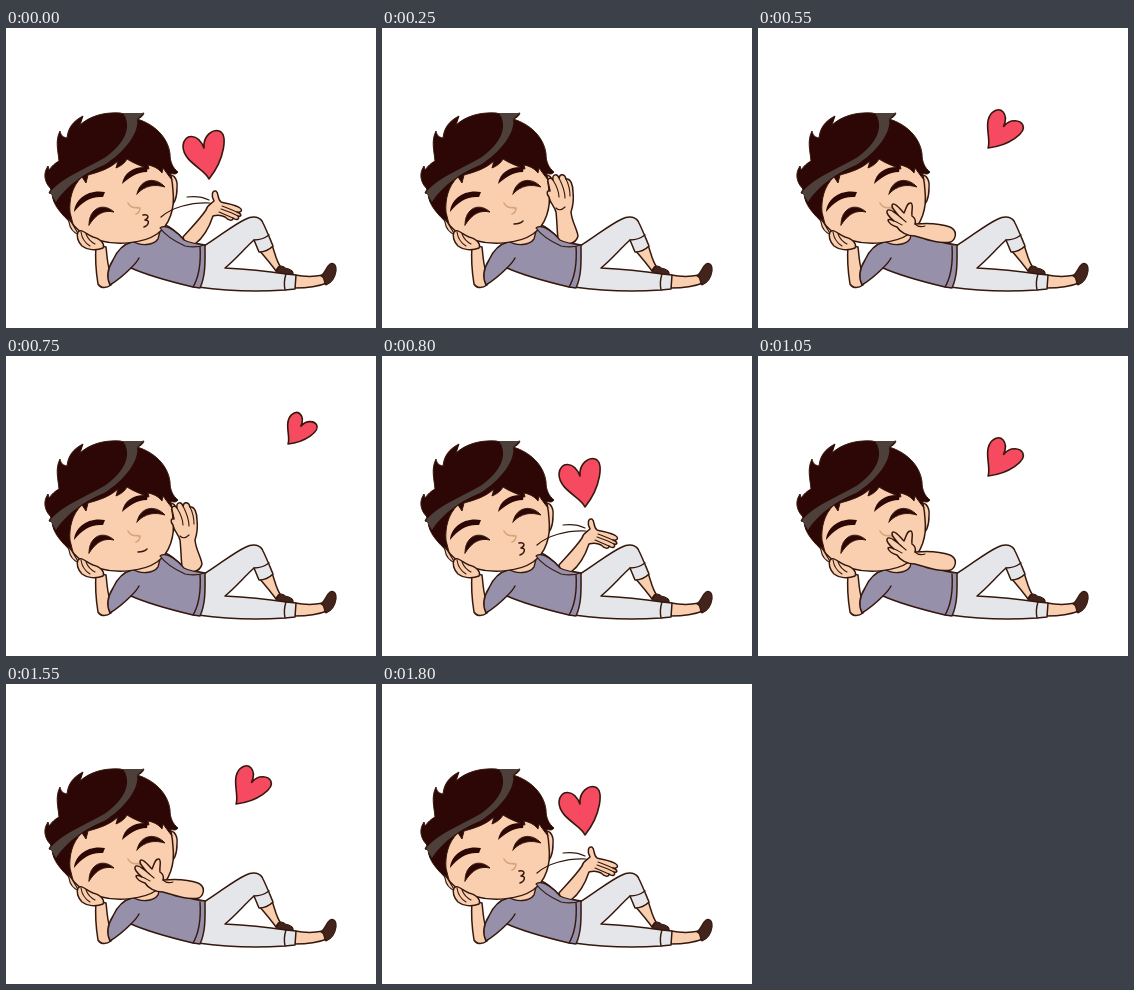
Recreate the animation shown at these times as an HTML page with a canvas. Size 370 px wide and 300 px high, loop 2000 ms.

```html
<!DOCTYPE html>
<html lang="en">
<head>
<meta charset="utf-8">
<title>Blown kiss</title>
<style>
html, body { margin: 0; width: 100%; height: 100%; overflow: hidden; background: #fff; }
canvas { display: block; width: 370px; height: 300px; }
</style>
</head>
<body>
<canvas id="stage" width="370" height="300"></canvas>
<script>
const ctx = document.getElementById('stage').getContext('2d');
const INK = '#35180d', HAIR = '#2d0705', SHINE = '#4d403b', SKIN = '#facfaf';
const SHIRT = '#9690aa', CLOTH = '#e4e6e9', SHOE = '#42241d', RED = '#f64a60';
const LOOP = 2000;

// start time, pose, heart place
const STEPS = [
  [0, 'blow', 'near'], [50, 'mouth', null], [250, 'cheek', null], [300, 'blow', 'near'],
  [550, 'mouth', 'mid'], [750, 'cheek', 'far'], [800, 'blow', 'near'],
  [1050, 'mouth', 'mid'], [1250, 'cheek', 'far'], [1300, 'blow', 'near'],
  [1550, 'mouth', 'mid'], [1750, 'cheek', 'far'], [1800, 'blow', 'near']
];

// tip x, tip y, degrees, scale
const HEARTS = { near: [203, 151, 0, 1], mid: [230, 120, 45, 0.85], far: [282, 88, 45, 0.7] };

function shape(d, fill, width = 1.5) {
  const p = new Path2D(d);
  ctx.fillStyle = fill;
  ctx.fill(p);
  if (width) stroke(p, width);
}

function stroke(p, width, color = INK) {
  ctx.strokeStyle = color;
  ctx.lineWidth = width;
  ctx.stroke(p);
}

function line(d, width = 1.4, color = INK) {
  stroke(new Path2D(d), width, color);
}

function drawLegs() {
  // feet
  shape('M253 222 L266 217 C269 225 270 232 274 238 L270 243 C265 236 259 229 253 222 Z', SKIN);
  shape('M270 243 C272 237 276 237 279 240 C284 241 288 243 287 247 L274 246 Z', SHOE, 1.2);
  shape('M289 247 C299 249 308 249 317 247 L321 255 C311 259 300 260 289 260 Z', SKIN);
  shape('M315 248 C319 245 320 239 324 236 C328 234 331 238 330 243 C329 250 325 255 320 257 C317 254 320 250 315 248 Z', SHOE, 1.2);
  // trousers
  shape('M198 218 C214 208 227 197 240 191 C247 187 255 189 257 195 C261 203 264 211 267 218 C263 222 258 224 253 224 ' +
    'L248 212 C238 221 230 231 219 240 C239 241 260 243 280 246 L290 247 L289 261 L279 262 C250 264 220 263 192 259 Z', CLOTH);
  line('M248 212 C253 212 259 210 263 207 M280 246 C278 252 278 257 279 262');
}

function drawShirt() {
  shape('M90 217 C89 231 90 244 92 256 C95 261 101 260 105 257 L104 243 C101 236 101 226 100 219 Z', SKIN);
  shape('M126 214 C118 216 111 223 107 232 C102 240 100 249 104 257 C112 252 119 246 125 240 ' +
    'C143 248 166 254 187 259 L194 260 C200 247 199 232 199 217 C190 216 183 214 178 212 ' +
    'C172 205 165 199 157 196 L148 206 C141 211 134 214 126 214 Z', SHIRT);
  line('M125 240 C128 237 131 234 133 230 M187 259 C193 249 195 234 194 218');
  shape('M126 213 C134 218 147 218 152 211 L155 199 L130 205 Z', SKIN, 1.3);
}

function drawFace(mouth) {
  // ear, then head
  shape('M160 150 C166 143 172 150 171 160 C171 170 168 178 163 178 Z', SKIN);
  shape('M62 187 C66 199 76 207 91 212 C112 218 138 215 151 206 C164 197 169 180 167 163 ' +
    'C166 146 162 130 150 122 L82 130 L62 155 Z', SKIN);
  shape('M67 197 C55 186 47 177 46 166 L43 165 L45 161 C38 154 37 145 42 138 L43 142 C46 138 49 135 53 133 ' +
    'C52 122 49 113 54 103 C55 108 57 109 61 110 C62 100 67 93 77 88 L74 97 C84 88 98 84 114 85 ' +
    'C122 87 130 87 138 85 C137 88 135 90 131 91 C148 96 162 109 164 126 C164 134 167 140 172 144 ' +
    'C170 147 167 146 164 145 L166 152 C162 147 160 144 157 140 L156 145 C152 140 147 138 142 137 ' +
    'L143 141 C135 138 127 135 121 131 C119 135 115 138 110 140 L112 133 C103 141 93 144 82 147 ' +
    'L80 155 L76 149 C66 158 63 172 64 184 Z', HAIR, 1);
  // hair shine
  shape('M117 85 L138 85 L131 91 C134 104 118 125 98 137 C80 144 60 158 50 174 L44 164 ' +
    'C58 148 82 140 100 129 C115 118 128 101 117 85 Z', SHINE, 0);
  // brows
  shape('M68 184 C69 171 82 161 99 164 L97 169 C85 168 76 174 68 184 Z', HAIR, 0);
  shape('M116 156 C118 144 128 138 142 139 L141 144 C131 144 124 149 116 156 Z', HAIR, 0);
  // closed eyes
  shape('M83 197 C83 180 97 174 108 184 C98 182 91 185 83 197 Z', HAIR, 1);
  shape('M131 166 C134 151 149 148 159 159 C149 156 139 157 131 166 Z', HAIR, 1);
  line('M122 175 C125 181 130 179 134 180 C134 183 133 185 130 186', 1.6, '#d2a67e');
  if (mouth === 'blow') line('M137 187 C142 186 144 189 139 192 C145 192 142 198 138 199', 1.5);
  if (mouth === 'cheek') line('M132 196 C136 196 139 195 141 193', 1.5);
}

function drawRestingHand() {
  shape('M67 197 C64 192 61 188 63 194 C64 201 68 205 73 207 Z', SKIN, 1.2);
  shape('M72 204 C75 200 80 206 87 209 C95 211 99 216 97 220 C90 223 81 222 76 218 C72 214 70 208 72 204 Z', SKIN);
  line('M75 204 C76 211 79 215 84 218 M80 206 C82 211 85 214 89 216', 1.1);
}

function drawSleeve() {
  shape('M154 200 C161 195 173 206 178 212 C184 215 191 216 198 217 C191 220 184 219 179 218 C168 213 159 207 154 200 Z', SHIRT, 1.2);
}

const arms = {
  blow() {
    shape('M177 209 C185 200 194 191 200 182 C201 177 205 176 208 173 C205 168 206 162 210 163 C213 165 211 171 215 174 ' +
      'C222 176 230 177 234 180 C237 182 235 185 231 184 C236 186 236 189 232 188 C234 191 231 193 227 190 ' +
      'C227 194 222 192 219 189 C215 187 211 187 207 188 C203 200 197 210 189 216 C183 218 178 215 177 209 Z', SKIN);
    line('M216 178 C222 180 226 182 231 184 M215 181 C221 183 227 185 232 188 M213 184 C218 186 222 188 227 190', 1.1);
    drawSleeve();
    line('M155 189 C165 180 184 174 204 175', 1.2);
    line('M181 169 C189 168 197 169 203 172', 1.2);
  },
  cheek() {
    shape('M176 211 C175 202 175 193 174 184 C173 179 168 175 167 169 C164 165 165 162 168 163 L166 154 ' +
      'C165 150 169 149 171 152 C170 146 175 145 177 150 C178 145 183 146 184 151 C189 150 191 158 191 164 ' +
      'C192 172 191 178 189 184 C190 194 195 201 196 208 C194 216 184 219 176 211 Z', SKIN);
    line('M171 152 C174 157 177 163 177 169 M177 150 C180 156 183 163 183 170 M184 151 C187 157 188 162 188 168 M174 180 C177 183 180 182 183 179', 1.1);
    drawSleeve();
  },
  mouth() {
    shape('M157 196 C168 195 181 195 192 199 C199 202 199 210 193 214 C181 216 170 212 157 208 ' +
      'C149 208 142 204 139 199 C135 198 130 195 130 192 C131 191 134 192 136 193 C131 189 127 184 130 182 ' +
      'C133 181 137 185 140 187 C136 182 132 178 135 176 C138 175 142 181 146 185 C148 181 149 174 153 175 ' +
      'C156 177 153 183 154 188 C157 190 158 193 157 196 Z', SKIN);
    line('M136 193 C139 194 142 196 144 197 M140 187 C143 190 146 192 148 194 M157 196 C160 199 164 199 167 198', 1.1);
  }
};

function drawHeart([x, y, deg, size]) {
  ctx.save();
  ctx.translate(x, y);
  ctx.rotate(deg * Math.PI / 180);
  ctx.scale(size, size);
  shape('M0 0 C-4 -10 -26 -17 -26 -33 C-25 -46 -11 -46 -5 -31 C-6 -44 4 -50 10 -48 C19 -45 16 -20 0 0 Z', RED, 1.6 / size);
  ctx.restore();
}

function draw(t) {
  const [, pose, heart] = STEPS.findLast(s => s[0] <= t);
  ctx.fillStyle = '#fff';
  ctx.fillRect(0, 0, 370, 300);
  ctx.lineCap = ctx.lineJoin = 'round';
  drawLegs();
  drawShirt();
  drawFace(pose);
  drawRestingHand();
  arms[pose]();
  if (heart) drawHeart(HEARTS[heart]);
}

const start = performance.now();
function tick() {
  draw((performance.now() - start) % LOOP);
  requestAnimationFrame(tick);
}
tick();
</script>
</body>
</html>
```
